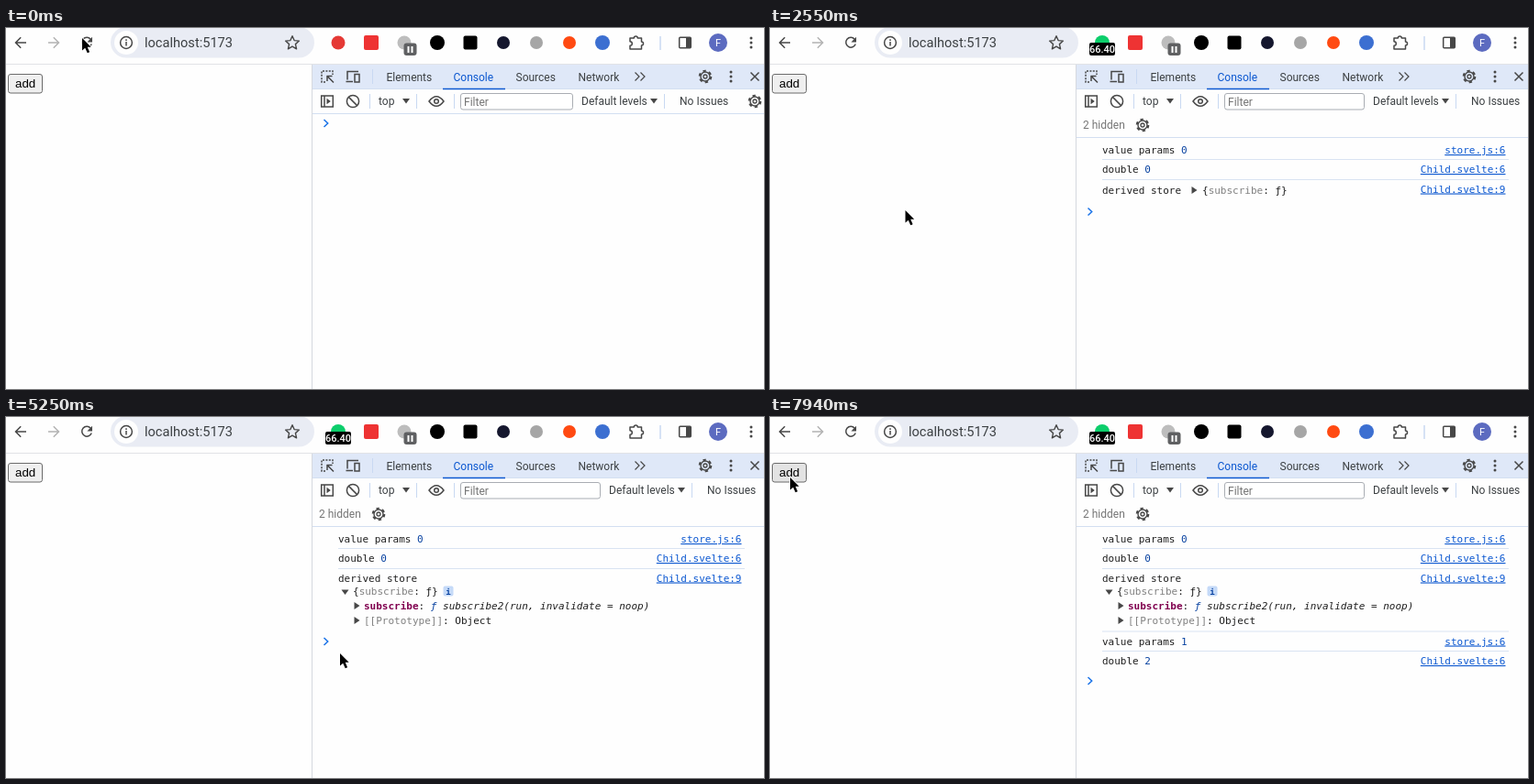
Write an HTML page that moves like this. It is 826 px wide and 394 px high and loops after 8000 ms.

```html
<!DOCTYPE html>
<html lang="en">
<head>
<meta charset="utf-8">
<title>Derived store in the console</title>
<style>
  html, body { margin: 0; width: 100%; height: 100%; overflow: hidden; background: #fefefe; }
  svg { display: block; width: 826px; height: 394px; }
  text { font: 12px Roboto, sans-serif; fill: #3c4043; white-space: pre; }
  .mono text { font: 11px "DejaVu Sans Mono", monospace; fill: #1f1f1f; }
  .mono .link { fill: #0b57d0; text-decoration: underline; }
  .num { fill: #0842a0; }
  .dim { fill: #808080; }
  .it { font-style: italic; }
  .key { fill: #80004f; font-weight: bold; }
  .icon { fill: none; stroke: #474747; stroke-width: 1.5; }
  .solid { fill: #474747; stroke: none; }
  .sep { stroke: #c9d9f2; fill: none; }
  .row { stroke: #d9e3f2; fill: none; }
</style>
</head>
<body>
<svg viewBox="0 0 826 394">
  <defs>
    <g id="gear" class="icon">
      <circle r="6.3" stroke-width="2" stroke-dasharray="3.3 3.3"/>
      <circle r="5" stroke-width="1.4"/>
      <circle r="2" stroke-width="1.3"/>
    </g>
    <g id="dots" class="solid"><circle cy="-5" r="1.5"/><circle r="1.5"/><circle cy="5" r="1.5"/></g>
    <path id="down" class="solid" d="M-4-2.5H4L0 3Z"/>
    <path id="closed" class="solid" d="M0-4L6 0L0 4Z"/>
    <clipPath id="badgeClip"><rect x="348" y="16" width="28" height="14" rx="2"/></clipPath>
  </defs>
  <rect width="826" height="394" fill="#fefefe"/>

  <!-- browser toolbar -->
  <path d="M0 39.5H826" stroke="#e1e3e6"/>
  <circle id="reloadHover" cx="88" cy="16" r="17" fill="#eeeeee"/>
  <g class="icon" stroke-width="1.8">
    <path d="M22 16H11M16.2 10.3L10.5 16L16.2 21.7"/>
    <path d="M46 16H57M51.8 10.3L57.5 16L51.8 21.7" stroke="#b3b3b3"/>
    <path d="M92.2 12.2A5.4 5.4 0 1 0 93.2 17.6"/>
    <path class="solid" d="M94 9.8V15.4H88.4Z"/>
  </g>
  <rect x="114" y="-1" width="222" height="33.5" rx="16.7" fill="#e9ecf4"/>
  <circle cx="131" cy="16" r="13" fill="#fefefe"/>
  <g class="icon">
    <circle cx="131" cy="16" r="6.4"/>
    <path d="M131 15V19.5M131 12.3V14"/>
    <path id="star" stroke-width="1.4" stroke-linejoin="round"/>
  </g>
  <text x="151" y="21" style="font-size:14.6px">localhost:5173</text>

  <!-- extension buttons -->
  <circle id="vitalRed" cx="362" cy="16" r="7.5" fill="#e53935"/>
  <rect id="vitalGrey" x="354" y="8" width="16" height="16" fill="#b5b6b8"/>
  <circle id="vitalGreen" cx="362" cy="16" r="8" fill="#0cce6b"/>
  <g id="badge" clip-path="url(#badgeClip)">
    <rect x="348" y="16" width="28" height="14" fill="#000"/>
    <text x="362" y="27" text-anchor="middle" style="font-size:11px;font-weight:500;fill:#fff">66.40</text>
  </g>
  <rect x="390" y="8" width="16" height="16" rx="2" fill="#ee3333"/>
  <circle cx="434" cy="16" r="7.5" fill="#bdbdbd"/>
  <rect x="433.5" y="16.5" width="14" height="13.5" rx="3" fill="#5f6062"/>
  <path d="M438.5 20V27M442.5 20V27" stroke="#fff" stroke-width="2"/>
  <circle cx="470" cy="16" r="8" fill="#000"/>
  <rect x="498.500" y="8.500" width="15" height="15" rx="2" fill="#000"/>
  <circle cx="542" cy="16" r="7" fill="#15172e"/>
  <circle cx="578" cy="16" r="7" fill="#a6a6a6"/>
  <circle cx="614" cy="16" r="7" fill="#ff4a12"/>
  <circle cx="650" cy="16" r="8" fill="#3c6fd1"/>
  <g class="icon" stroke-width="1.7">
    <path stroke-linejoin="round" d="M680 11H684.300A2 2 0 0 1 688.300 11H692.500V15A2 2 0 0 1 692.500 19V23H680V19.300A2.300 2.300 0 0 0 680 14.700Z"/>
    <rect x="733.700" y="10.200" width="12.600" height="11.600" rx="1"/>
    <path class="solid" d="M741 10H746V22H741Z"/>
  </g>
  <path class="sep" d="M713 9V24" stroke-width="1.5"/>
  <circle cx="776" cy="16" r="10" fill="#5c6bc0"/>
  <text x="776" y="20" text-anchor="middle" style="font-size:11px;fill:#fff">F</text>
  <use href="#dots" x="812" y="16"/>

  <!-- page -->
  <rect id="button" x="2.500" y="50.500" width="37" height="20.500" rx="2.500" stroke="#6b6b6b"/>
  <text x="10" y="65.300" style="font:13.333px 'Liberation Sans',Arial,sans-serif;fill:#000">add</text>

  <!-- developer tools -->
  <rect x="334" y="40" width="492" height="27" fill="#dfe8f8"/>
  <path d="M333.500 40V394" stroke="#d5d9df"/>
  <path d="M334 66.500H826M334 93.500H826" stroke="#d3dff1"/>
  <path d="M476 66.500H544" stroke="#0b57d0" stroke-width="1.600"/>
  <g class="icon" stroke-width="1.400">
    <path d="M348 59H344V47H356V51" stroke-dasharray="2 1.400"/>
    <path d="M349.500 52.500H355.500M350 52V58M350 52.500L357 59.500"/>
    <path d="M372 56.500V47.500H384M370.500 58.500H378"/>
    <rect x="380" y="50.500" width="5" height="8.500"/>
    <path d="M685.500 48.500L690 53L685.500 57.500M691.500 48.500L696 53L691.500 57.500" stroke-width="1.200"/>
    <path d="M811.500 48.500L820.500 57.500M820.500 48.500L811.500 57.500"/>
    <rect x="343.700" y="74" width="12.600" height="12"/>
    <path d="M347 74V86"/>
    <path class="solid" d="M349.500 76.800L353.800 80L349.500 83.200Z"/>
    <circle cx="378" cy="80" r="6.600"/>
    <path d="M373.400 75.400L382.600 84.600"/>
    <path d="M461 80Q469 69.500 477 80Q469 90.500 461 80Z"/>
    <circle cx="469" cy="80" r="2.300"/>
  </g>
  <use href="#gear" x="762" y="53"/>
  <use href="#dots" x="790" y="53"/>
  <use href="#down" x="436" y="79.500"/>
  <path class="sep" d="M399.500 45V61M396.500 72V88M447.500 72V88M488.500 72V88"/>
  <text x="414.500" y="57.500">Elements</text>
  <text x="487.500" y="57.500" style="fill:#0b57d0">Console</text>
  <text x="555.500" y="57.500">Sources</text>
  <text x="623.500" y="57.500">Network</text>
  <text x="406" y="84.300">top</text>
  <rect id="filter" x="495.500" y="71.500" width="122" height="17.500" rx="2.500" fill="#fff" stroke="#a9adb3"/>
  <text x="499" y="84.500" style="fill:#757575">Filter</text>
  <g id="levels">
    <text x="627" y="84.300">Default levels</text>
    <use href="#down" x="706" y="79.500"/>
    <path class="sep" d="M717.500 72V88"/>
    <text x="734" y="84.300">No Issues</text>
  </g>
  <use id="consoleGear" href="#gear"/>
  <g id="hiddenBar">
    <rect x="334" y="92" width="492" height="28" fill="#fefefe"/>
    <path d="M334 119.500H826" stroke="#d3dff1"/>
    <text x="341" y="110.300" style="fill:#757575">2 hidden</text>
    <use href="#gear" x="406" y="106"/>
  </g>

  <!-- console output -->
  <g class="mono">
    <g id="logs"></g>
    <g id="collapsed">
      <text x="362" y="180.500">derived store</text>
      <use href="#closed" x="459.500" y="177"/>
      <text class="it" x="471" y="181">{<tspan class="dim">subscribe</tspan>: ƒ}</text>
    </g>
    <g id="expanded">
      <text x="362" y="179.500">derived store</text>
      <use href="#down" x="369.500" y="191"/>
      <text class="it" x="378" y="194">{<tspan class="dim">subscribe</tspan>: ƒ}</text>
      <rect x="476.500" y="184.500" width="11" height="11" rx="2" fill="#c5daf8"/>
      <text class="it" x="479.300" y="193.500" style="font-size:9px;font-weight:bold;fill:#0842a0">i</text>
      <use href="#closed" x="379.500" y="206"/>
      <text x="390" y="210"><tspan class="key">subscribe</tspan>: <tspan class="it"><tspan class="num">ƒ</tspan> subscribe2(run, invalidate = noop)</tspan></text>
      <use href="#closed" x="379.500" y="222"/>
      <text x="390" y="226"><tspan class="dim">[[Prototype]]</tspan>: Object</text>
    </g>
    <g id="added"></g>
  </g>
  <path id="prompt" d="M346.500-4L350.700 0L346.500 4" fill="none" stroke="#1a73e8" stroke-width="1.500"/>

  <path id="cursor" d="M0 0V13.500L3.200 10.700L5.700 16.300L8.100 15.200L5.700 9.800H9.700Z" stroke="#fff" stroke-width="1.600" paint-order="stroke" fill="#000"/>
</svg>
<script>
const LOOP = 8000, STEP = 150, SHIFTED = 6440;
const RELOADED = 1050, EXPANDED = 4350, PRESSED = 7790, RELEASED = 7940;

// time, x, y of the pointer tip
const PATH = [
  [0, 83, 11], [300, 82, 12], [1050, 82, 12], [1200, 81, 16], [1650, 83, 93],
  [1950, 83, 129], [2250, 83, 129], [2400, 95, 155], [2700, 200, 243], [2850, 275, 249],
  [3000, 355, 234], [3150, 423, 206], [3300, 455, 190], [3900, 460, 179], [4650, 460, 179],
  [4800, 453, 191], [5100, 404, 241], [5250, 364, 258], [5400, 275, 275], [5550, 182, 281],
  [5700, 182, 281], [6000, 148, 255], [6440, 75, 196], [6740, 36, 112], [6890, 22, 73],
  [7040, 22, 67], [7190, 22, 66], [LOOP, 22, 66]
];

const el = id => document.getElementById(id);
const show = (id, on) => el(id).setAttribute("visibility", on ? "visible" : "hidden");
const move = (id, x, y) => el(id).setAttribute("transform", `translate(${x} ${y})`);

const link = (text, y) => `<text class="link" x="801.5" y="${y}" text-anchor="end">${text}</text>`;
const line = y => `<path class="row" d="M362 ${y}H805"/>`;
const log = (label, value, source, y) =>
  `<text x="362" y="${y}">${label} <tspan class="num">${value}</tspan></text>` + link(source, y);

el("logs").innerHTML = log("value params", 0, "store.js:6", 137) + line(143.5) +
  log("double", 0, "Child.svelte:6", 158) + line(165.5) + link("Child.svelte:9", 179.5);
el("added").innerHTML = line(234) + log("value params", 1, "store.js:6", 248.5) +
  line(255.5) + log("double", 2, "Child.svelte:6", 270);

el("star").setAttribute("d", "M" + Array.from({ length: 10 }, (_, i) => {
  const r = i % 2 ? 3.6 : 7.8, a = (i / 5 - .5) * Math.PI;
  return `${312 + r * Math.cos(a)} ${16.5 + r * Math.sin(a)}`;
}).join("L") + "Z");

function pointerAt(t) {
  const i = PATH.findIndex(p => p[0] > t);
  const [t0, x0, y0] = PATH[i - 1], [t1, x1, y1] = PATH[i];
  const k = (t - t0) / (t1 - t0);
  return [x0 + (x1 - x0) * k, y0 + (y1 - y0) * k];
}

function draw(time) {
  const start = time < SHIFTED ? 0 : SHIFTED;
  const t = start + Math.floor((time - start) / STEP) * STEP;
  const [x, y] = pointerAt(t);
  const loaded = t >= RELOADED, open = t >= EXPANDED, added = t >= RELEASED;

  move("cursor", x, y);
  show("reloadHover", t >= 150 && y < 33 && t < 1650);
  show("vitalRed", t < 750);
  show("vitalGrey", t >= 750 && t < 1200);
  show("vitalGreen", t >= 1200);
  show("badge", loaded);

  el("filter").setAttribute("width", loaded ? 152 : 122);
  move("levels", loaded ? 30 : 0, 0);
  move("consoleGear", 816, 80);
  show("consoleGear", !loaded);
  show("hiddenBar", loaded);
  show("logs", loaded);
  show("collapsed", loaded && !open);
  show("expanded", open);
  show("added", added);
  move("prompt", 0, added ? 288 : open ? 245 : loaded ? 200.5 : 104);

  const pressed = t >= PRESSED && t < RELEASED;
  el("button").setAttribute("fill", pressed ? "#f5f5f5" : t >= 7040 ? "#e3e3e3" : "#efefef");
}

const began = performance.now();
function tick() {
  draw((performance.now() - began) % LOOP);
  requestAnimationFrame(tick);
}
tick();
</script>
</body>
</html>
```
